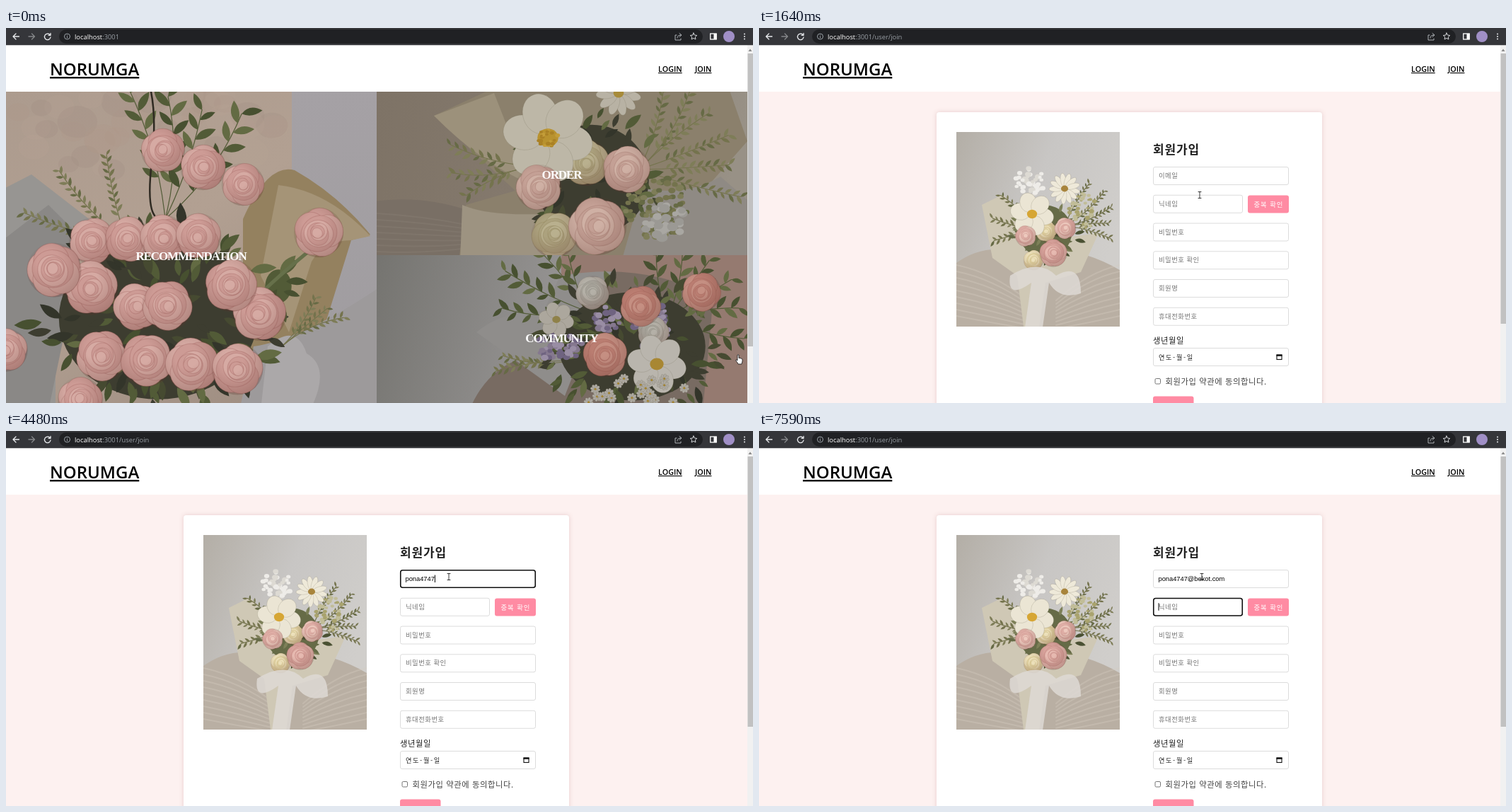
An HTML page that plays this animation: 1056 by 530 pixels, repeating every 8000 ms.

```html
<!DOCTYPE html>
<html lang="ko">
<head>
<meta charset="utf-8">
<title>Join</title>
<style>
html, body { margin: 0; width: 100%; height: 100%; overflow: hidden; background: #fff; }
svg { display: block; }
.ui { font-family: "Open Sans", "Noto Sans", sans-serif; }
.ko { font-family: "Noto Sans CJK KR", "Noto Sans CJK", sans-serif; letter-spacing: .05em; }
.mail { font-family: "Liberation Sans", Arial, sans-serif; }
.tile { font: bold 17px "Liberation Serif", "Noto Serif", serif; letter-spacing: -1.1px; text-anchor: middle; }
.link { font-weight: 600; text-decoration: underline; }
.line { fill: none; stroke-linecap: round; stroke-linejoin: round; }
.soft { filter: blur(.6px); }
</style>
</head>
<body>
<svg id="stage" width="1056" height="530" viewBox="0 0 1056 530"></svg>
<script>
let seed = 11;
const rnd = () => (seed = seed * 16807 % 2147483647) / 2147483647;
const span = (a, b) => a + (b - a) * rnd();
const pick = list => list[Math.floor(rnd() * list.length)];
const mix = (a, b, p) => a + (b - a) * p;
const clamp = v => Math.max(0, Math.min(1, v));
const repeat = (n, fn) => Array.from({ length: n }, (_, i) => fn(i)).join('');

const rect = (x, y, w, h, fill, more = '') =>
  `<rect x="${x}" y="${y}" width="${w}" height="${h}" fill="${fill}" ${more}/>`;
const oval = (x, y, rx, ry, fill, more = '') =>
  `<ellipse cx="${x}" cy="${y}" rx="${rx}" ry="${ry}" fill="${fill}" ${more}/>`;
const shape = (d, fill, more = '') => `<path d="${d}" fill="${fill}" ${more}/>`;
const line = (d, color, width = 1, more = '') =>
  `<path class="line" d="${d}" stroke="${color}" stroke-width="${width}" ${more}/>`;
const text = (x, y, size, str, cls, fill, more = '') =>
  `<text x="${x}" y="${y}" font-size="${size}" class="${cls}" fill="${fill}" ${more}>${str}</text>`;
const grad = (id, x2, y2, ...colors) =>
  `<linearGradient id="${id}" x2="${x2}" y2="${y2}">${colors.map((c, i) =>
    `<stop offset="${i / (colors.length - 1)}" stop-color="${c}"/>`).join('')}</linearGradient>`;
const photo = (x, y, w, h, fill, body) =>
  `<svg x="${x}" y="${y}" width="${w}" height="${h}" viewBox="${x} ${y} ${w} ${h}">${
    rect(x, y, w, h, fill)}<g class="soft">${body}</g></svg>`;

// Flowers and greenery
function rose(x, y, r, [light, mid, dark]) {
  const turn = span(0, 360);
  const edge = `stroke="${dark}" stroke-opacity=".3" stroke-width="${r * .03}"`;
  const outer = repeat(5, i => oval(r * .36, 0, r * .58, r * .62, i % 2 ? mid : light,
    `${edge} transform="rotate(${turn + i * 144})"`));
  const inner = repeat(6, i => oval(span(-.06, .06) * r, span(-.06, .06) * r, r * .72 * .78 ** i, r * .66 * .78 ** i,
    i % 2 ? light : mid, `${edge} transform="rotate(${turn + i * 55})"`));
  return `<g transform="translate(${x} ${y})">${outer}${inner}${oval(0, 0, r * .95, r * .95, 'url(#shade)')}</g>`;
}
const row = (x0, y0, x1, y1, n, r, tone) => repeat(n, i => {
  const p = n > 1 ? i / (n - 1) : 0;
  return rose(mix(x0, x1, p), mix(y0, y1, p), r * span(.93, 1.05), tone);
});
const daisy = (x, y, r, n, petal, core) =>
  `<g transform="translate(${x} ${y})">${repeat(n, i => oval(r * .55, 0, r * .45, r * 2.3 / n, petal,
    `stroke="#6b6450" stroke-opacity=".25" stroke-width=".7" transform="rotate(${i * 360 / n + 12})"`))}${
    oval(0, 0, r * .23, r * .2, core)}</g>`;
const leaf = (x, y, len, angle, fill) =>
  shape(`M0 0Q${len * .45} ${-len * .42} ${len} 0Q${len * .45} ${len * .3} 0 0`, fill,
    `transform="translate(${x} ${y}) rotate(${angle})"`);

// Leafy stems spread between two angles
const fan = (x, y, from, to, n, reach, len, cols) => repeat(n, i => {
  const angle = mix(from, to, i / (n - 1)), size = reach * span(.85, 1.1), bend = span(-.15, .15) * size;
  const leaves = Math.round(size / len * 1.7);
  return `<g transform="translate(${x} ${y}) rotate(${angle})">${
    line(`M0 0Q${size / 2} ${bend} ${size} 0`, cols[0], 1.2)}${repeat(leaves, k => {
      const p = mix(.3, 1, k / (leaves - 1));
      return leaf(size * p, 2 * p * (1 - p) * bend, len * span(.75, 1.1), k % 2 ? 45 : -45, pick(cols));
    })}</g>`;
});
const scatter = (x, y, rx, ry, n, draw) => repeat(n, () => {
  const a = span(0, 2 * Math.PI), d = Math.sqrt(rnd());
  return draw(x + rx * d * Math.cos(a), y + ry * d * Math.sin(a), a * 180 / Math.PI);
});
const cluster = (x, y, rx, ry, n, size, cols) => scatter(x, y, rx, ry, n, (px, py) => {
  const s = size * span(.6, 1.2);
  return oval(px, py, s, s * .8, pick(cols));
});
const foliage = (x, y, rx, ry, n, len, cols) => oval(x, y, rx * .85, ry * .85, cols[0]) +
  scatter(x, y, rx, ry, n, (px, py, a) => leaf(px, py, len * span(.6, 1.1), a + span(-40, 40), pick(cols)));
const folds = (n, x0, y0, x1, y1, color) => repeat(n, i =>
  line(`M${x0} ${y0 + i * 9}Q${mix(x0, x1, .5)} ${mix(y0, y1, .2) + i * 9} ${x1} ${y1 + i * 5}`, color, 2, 'opacity=".35"'));

const PINK = ['#d6aaa3', '#cd9b95', '#9c5d5a'];
const PALE = ['#cfb0a4', '#c4a095', '#9a6d64'];
const CREAM = ['#b9b08e', '#aca27e', '#877b50'];
const CORAL = ['#c58f82', '#ba7d71', '#94564e'];
const GREY = ['#b4b0a7', '#a5a198', '#7d7b70'];
const GREEN = ['#525b37', '#475030', '#636b43'];
const DARK = ['#3d3d30', '#33352a', '#464a31', ...GREEN];
const OLIVE = ['#74734d', '#666a45', '#7e7d58'];
const VIOLET = ['#85788f', '#998da4', '#6f6380'];

const bouquet = photo(0, 90, 524, 440, 'url(#plaster)',
  cluster(200, 140, 200, 70, 40, 24, ['#b9a69833', '#9b897d33', '#af968833']) +
  rect(404, 80, 130, 460, 'url(#lilac)') +
  shape('M-5 228L36 207L120 272L70 320V540H-5Z', '#979592') +
  shape('M-5 300L60 250L110 300L60 540H-5Z', '#8a8886') +
  shape('M335 270Q370 190 408 201Q470 236 515 292L488 300L440 455L335 460Z', '#94815f') +
  shape('M385 222Q455 230 515 294L488 300Q450 300 432 330L400 430L360 350Z', '#a59477') +
  shape('M350 450Q420 440 530 365V540H330Z', '#9d9a9b') +
  shape('M370 450Q410 415 425 460Q460 480 430 540H360Z', '#aba8a9') +
  fan(170, 300, -165, -103, 3, 145, 12, OLIVE) + fan(390, 450, -55, -25, 3, 95, 10, OLIVE) +
  fan(225, 270, -106, -54, 4, 190, 30, GREEN) + line('M205 90Q213 130 206 190T210 265', '#2f2a22', 2.5) +
  foliage(215, 410, 165, 135, 130, 36, DARK) + foliage(385, 365, 22, 28, 9, 32, GREEN) +
  line('M435 310Q385 350 350 385', '#66704a', 5) +
  row(222, 173, 335, 221, 3, 34, PINK) + row(122, 301, 272, 294, 4, 35, PINK) +
  row(120, 367, 68, 342, 2, 40, PINK) + row(185, 394, 228, 392, 2, 38, PINK) +
  row(358, 404, 318, 364, 2, 39, PINK) + row(135, 463, 327, 482, 4, 39, PINK) +
  row(442, 289, 442, 289, 1, 37, PINK) + row(0, 455, 105, 525, 2, 33, PINK));

const order = photo(524, 90, 524, 231, 'url(#sand)',
  shape('M520 245Q590 235 660 260V330H520Z', '#796f65') + folds(7, 524, 262, 660, 280, '#8a8077') +
  shape('M605 124L700 80H1020L1048 160L960 260L900 330H640L650 250L720 230Z', '#8b806c') +
  shape('M605 124L690 92L740 220Q670 190 605 124', '#9c917b') +
  shape('M645 250Q690 270 800 260L780 330H642Z', '#9d9381') +
  shape('M900 225Q960 240 1010 210L1056 250V330H870Z', '#8f8a84') +
  fan(740, 195, 155, 195, 3, 110, 14, OLIVE) + fan(895, 200, -75, 15, 6, 145, 13, OLIVE) +
  foliage(828, 215, 95, 92, 65, 28, DARK) + cluster(920, 255, 45, 45, 90, 5, OLIVE) +
  cluster(930, 272, 30, 28, 30, 7, ['#a9a7a2', '#9b9994']) +
  daisy(866, 92, 32, 11, '#b8b2a4', '#a78b3a') + row(820, 190, 775, 292, 2, 33, CREAM) +
  daisy(766, 155, 64, 6, '#bdb7a7', '#b8922f') + cluster(766, 155, 15, 12, 24, 3, ['#c39d39', '#aa8125']) +
  row(753, 225, 877, 200, 2, 35, PALE) + row(836, 280, 836, 280, 1, 44, PALE));

const community = photo(524, 321, 524, 209, 'url(#mist)',
  shape('M655 540Q680 480 735 465Q750 400 800 350L1056 315V540Z', '#786b62') +
  shape('M665 430Q700 400 760 400L800 315H870L790 520Z', '#8f8d8b') +
  shape('M785 315H1056V540H985L1000 380Q900 330 785 350Z', '#957a70') +
  fan(820, 400, -178, -105, 4, 130, 22, GREEN) + fan(935, 410, -100, 15, 6, 105, 22, GREEN) +
  fan(800, 470, 172, 184, 2, 105, 11, OLIVE) + foliage(885, 450, 122, 90, 110, 26, DARK) +
  scatter(860, 425, 110, 60, 7, (x, y) => cluster(x, y, 18, 18, 26, 5, VIOLET)) +
  row(829, 374, 915, 430, 2, 24, GREY) + row(897, 393, 983, 373, 2, 31, CORAL) +
  row(847, 462, 847, 462, 1, 35, CORAL) + daisy(778, 412, 25, 6, '#aca79d', '#8f8149') +
  daisy(920, 475, 42, 6, '#b9b5ad', '#a88733') +
  repeat(22, () => daisy(span(815, 960), span(495, 530), 7, 8, '#aeaaa2', '#a3832e')));

const vase = photo(279, 147, 231, 275, 'url(#room)',
  shape('M275 335Q320 300 375 320Q440 300 515 345V430H275Z', '#b9afa3') +
  folds(9, 279, 335, 380, 385, '#d5ccc0') + folds(9, 510, 335, 420, 385, '#d5ccc0') +
  shape('M315 250L345 235L400 300L480 290L455 345L405 360L395 430H375L365 350L330 325Z', '#cfc8b5') +
  fan(390, 285, 165, 225, 3, 68, 9, OLIVE) + fan(432, 280, -60, 15, 5, 72, 7, OLIVE) +
  foliage(405, 288, 44, 44, 40, 15, ['#666b47', '#7d8058', '#4a5133']) +
  cluster(457, 258, 20, 28, 45, 3, ['#a9a36e', '#c1bd98']) +
  cluster(382, 217, 22, 19, 40, 4, ['#eeece8', '#dddad3']) + daisy(432, 227, 22, 13, '#eee9d9', '#a8843c') +
  row(406, 287, 388, 328, 2, 16, ['#ece0ba', '#decf9f', '#b9a468']) + daisy(386, 263, 31, 6, '#ebe5d4', '#d6a635') +
  row(377, 294, 433, 283, 2, 16, ['#edc8bd', '#dfaea6', '#b5756f']) +
  row(416, 318, 416, 318, 1, 20, ['#e6b9b0', '#d8a39c', '#a9655f']) +
  shape('M355 350Q395 325 420 350Q455 330 455 375Q425 385 410 360L400 430H375L385 360Q350 385 355 350', '#dedad5', 'opacity=".85"'));

// Browser frame and page header
const chrome =
  rect(0, 0, 1056, 24.5, '#35363a') + rect(75, 2, 910, 20, '#202124', 'rx="10"') +
  line('M18.5 12H10M14 8L10 12L14 16', '#e8eaed', 1.3) +
  line('M32 12H40.5M36.5 8L40.5 12L36.5 16', '#85878a', 1.3) +
  line('M62 9.5A4.3 4.3 0 1 0 63 13M63 7.5V10.3H60', '#e8eaed', 1.3) +
  oval(86.5, 12, 4, 4, 'none', 'stroke="#9aa0a6"') + line('M86.5 11.8V14M86.5 9.9V10', '#9aa0a6') +
  text(97, 15.5, 9.35, 'localhost<tspan fill="#9aa0a6">:3001<tspan id="path"></tspan></tspan>', 'ui', '#fff') +
  line('M948 10H946V17H954V15M949 14Q949 10 954 10M952 7.5L955 10L952 12.5', '#bdc1c6', .9) +
  line(`M${Array.from({ length: 10 }, (_, i) => {
    const a = Math.PI * (i / 5 - .5), r = i % 2 ? 2.4 : 5;
    return `${972 + r * Math.cos(a)} ${12 + r * Math.sin(a)}`;
  }).join('L')}Z`, '#d5d7da') +
  rect(995.7, 8, 8.5, 8, 'none', 'stroke="#fff" stroke-width="1.3"') + rect(1000.5, 8, 4, 8, '#fff') +
  oval(1022, 12, 8, 8, '#a08fc6') + repeat(3, i => oval(1044, 8.5 + i * 3.5, 1, 1, '#e8eaed')) +
  rect(0, 24.5, 1048, 65.5, '#fff') + text(62, 67, 24, 'NORUMGA', 'ui link', '#000') +
  text(922, 62, 10.8, 'LOGIN', 'ui link', '#000') + text(974, 62, 10.8, 'JOIN', 'ui link', '#000') +
  rect(1048, 24.5, 8, 506, '#f1f1f1') + shape('M1049.5 33L1052 29.5L1054.5 33Z', '#8a8a8a') +
  rect(1048.5, 36, 7.5, 414, '#c1c1c1', 'id="thumb"');

const home = bouquet + order + community +
  text(261.5, 328, 17, 'RECOMMENDATION', 'tile', '#fff') +
  text(785.5, 212.5, 17, 'ORDER', 'tile', '#fff') + text(785.5, 443.5, 17, 'COMMUNITY', 'tile', '#fff');

const LEFT = 557, GAP = 39.75, WIDE = 192, NARROW = 127;
const fieldTop = i => 196 + i * GAP;
const box = (y, w) => rect(LEFT + .5, y + .5, w - 1, 25, '#fff', 'rx="2.5" stroke="#dcdcdc"');
const ring = (id, i, w) => rect(LEFT + .75, fieldTop(i) + .75, w - 1.5, 24.5, 'none',
  `id="${id}" rx="3" stroke="#101010" stroke-width="1.6"`);
const fields = ['이메일', '닉네임', '비밀번호', '비밀번호 확인', '회원명', '휴대전화번호'].map((hint, i) =>
  box(fieldTop(i), i === 1 ? NARROW : WIDE) +
  text(LEFT + 8, fieldTop(i) + 16, 9.4, hint, 'ko', '#757575', `id="hint${i}"`)).join('');

const join =
  rect(0, 90, 1048, 440, '#fdf1f0') +
  rect(251, 119, 545, 430, '#fff', 'rx="4" style="filter:drop-shadow(0 0 3px #e8cccc)"') + vase +
  text(LEFT, 178, 17, '회원가입', 'ko', '#212121', 'font-weight="700"') +
  fields + ring('mailRing', 0, WIDE) + ring('nickRing', 1, NARROW) +
  rect(691, 236.5, 58, 25, '#ff8ba3', 'rx="3"') +
  text(699.5, 252.5, 9.4, '중복 확인', 'ko', '#fff', 'style="letter-spacing:.1em"') +
  text(LEFT, 446, 11.35, '생년월일', 'ko', '#222') + box(452, WIDE) +
  text(LEFT + 8, 468.5, 9.2, '연도-월-일', 'ko', '#222', 'style="letter-spacing:1.6px"') +
  rect(732, 462, 7, 6.5, 'none', 'stroke="#111" stroke-width="1.1"') + rect(731.5, 461.5, 8, 2.3, '#111') +
  rect(560, 495.5, 7.5, 7.5, '#fff', 'rx="1.5" stroke="#767676"') +
  text(574.5, 503.5, 11.35, '회원가입 약관에 동의합니다.', 'ko', '#444') +
  rect(LEFT, 520.5, 57.5, 25, '#ff8ba3', 'rx="3"') +
  text(LEFT + 7.5, 212, 9.3, '', 'mail', '#000', 'id="mail"') +
  rect(LEFT + 7.5, 203.5, 1, 10.5, '#000', 'id="caret"');

const outlined = 'stroke="#111" stroke-width=".8"';
const $ = id => document.getElementById(id);
$('stage').innerHTML = `<defs>${
  grad('plaster', .7, 1, '#ac9b8e', '#b2a092', '#9f8e82') + grad('lilac', 0, 1, '#a5a1a5', '#9f9c9f') +
  grad('sand', 1, .1, '#7e7366', '#857a6e', '#989186') + grad('mist', 1, .1, '#757470', '#949291', '#969494') +
  grad('room', 1, .5, '#b3aea6', '#c8c6c4', '#d0cecb')}
  <radialGradient id="shade" cx=".4" cy=".35" r=".7"><stop offset=".3" stop-color="#5a3029" stop-opacity="0"/>
  <stop offset="1" stop-color="#5a3029" stop-opacity=".3"/></radialGradient></defs>
  <g id="home">${home}</g><g id="join">${join}</g>${chrome}
  <g id="status">${rect(-4, 523, 101, 20, '#58595c', 'rx="2"')}${text(2, 534, 8, 'localhost:3001/user/join', 'ui', '#d5d6d8')}</g>
  <g id="cursor">${
    shape('M-2 2V-5Q-2-6.4-1-6.4T0-5V-1.5Q1-2 2-1.2Q3-1.6 3.6-.7Q5-.8 5 .8V3Q4.4 5 4 7H-1Q-2 4.5-4.2 2Q-4.6.5-3.2.8Z', '#fff', outlined)}${
    shape('M0 0V11L2.6 8.6L4.4 12.5L6 11.8L4.3 8H8Z', '#fff', outlined)}${
    line('M-2-4.5H2M0-4.5V4.5M-2 4.5H2', '#222', .9)}</g>`;

const LOOP = 8000, STEP = 85.6, KEY_GAP = 90, BLINK = 520;
const PAGE_AT = 1000, FOCUS_AT = 2000, TAB_AT = 7590;
const MOVES = [
  { start: 70, end: 840, from: [1036, 468], bend: [955, 0], to: [983, 64] },
  { start: 1110, end: 1640, from: [983, 64], bend: [740, 180], to: [623, 236] },
  { start: 1720, end: 1810, from: [623, 236], bend: [625, 212], to: [626, 206] },
];
// Each burst of typing, by the time of its first key
const BURSTS = {
  2860: 'pona', 3940: '4', 4200: '7', 4390: '47', 5310: '@', 5570: 'b',
  5660: 'ek', 5930: 'ot', 6640: '.', 6790: 'co', 7070: 'm',
};
const KEYS = Object.entries(BURSTS).flatMap(([at, str]) =>
  [...str].map((char, i) => ({ char, at: +at + i * KEY_GAP })));

const show = (node, on) => node.setAttribute('visibility', on ? 'visible' : 'hidden');

function cursorAt(t) {
  const { start, end, from, bend, to } = MOVES.filter(m => t >= m.start).pop() || MOVES[0];
  const steps = Math.round((end - start) / STEP) + 1;
  const p = clamp((Math.floor((t - start) / (end - start) * (steps - 1)) + 1) / steps), q = 1 - p;
  return from.map((v, i) => q * q * v + 2 * q * p * bend[i] + p * p * to[i]);
}

function draw(t) {
  const joined = t >= PAGE_AT, focused = t >= FOCUS_AT, tabbed = t >= TAB_AT;
  $('home').style.display = joined ? 'none' : '';
  $('join').style.display = joined ? '' : 'none';
  $('path').textContent = joined ? '/user/join' : '';
  $('thumb').setAttribute('height', joined ? 382 : 414);
  $('status').setAttribute('opacity', t < 910 ? 0 : joined ? clamp((1500 - t) / 200) : .3);

  $('cursor').setAttribute('transform', `translate(${cursorAt(t)})`);
  const kind = MOVES.slice(1).filter(m => t >= m.start).length;
  [...$('cursor').children].forEach((node, i) => show(node, i === (t >= 1640 ? 2 : kind)));

  const typed = KEYS.filter(k => t >= k.at);
  $('mail').textContent = typed.map(k => k.char).join('');
  show($('hint0'), joined && !typed.length);
  $('hint0').style.display = typed.length ? 'none' : '';
  $('mailRing').setAttribute('opacity', focused && !tabbed ? clamp((Math.floor((t - FOCUS_AT) / 80) + 1) / 3) : 0);
  $('nickRing').setAttribute('opacity', tabbed ? 1 : 0);

  const wake = tabbed ? TAB_AT : typed.length ? typed[typed.length - 1].at : FOCUS_AT;
  const caret = $('caret');
  caret.setAttribute('opacity', focused && (t - wake) % (2 * BLINK) < BLINK ? 1 : 0);
  caret.setAttribute('x', LEFT + 7.5 + (typed.length && !tabbed ? $('mail').getComputedTextLength() : 0));
  caret.setAttribute('y', fieldTop(tabbed ? 1 : 0) + 7.5);
}

const begin = performance.now();
function tick() {
  draw((performance.now() - begin) % LOOP);
  requestAnimationFrame(tick);
}
tick();
</script>
</body>
</html>
```
